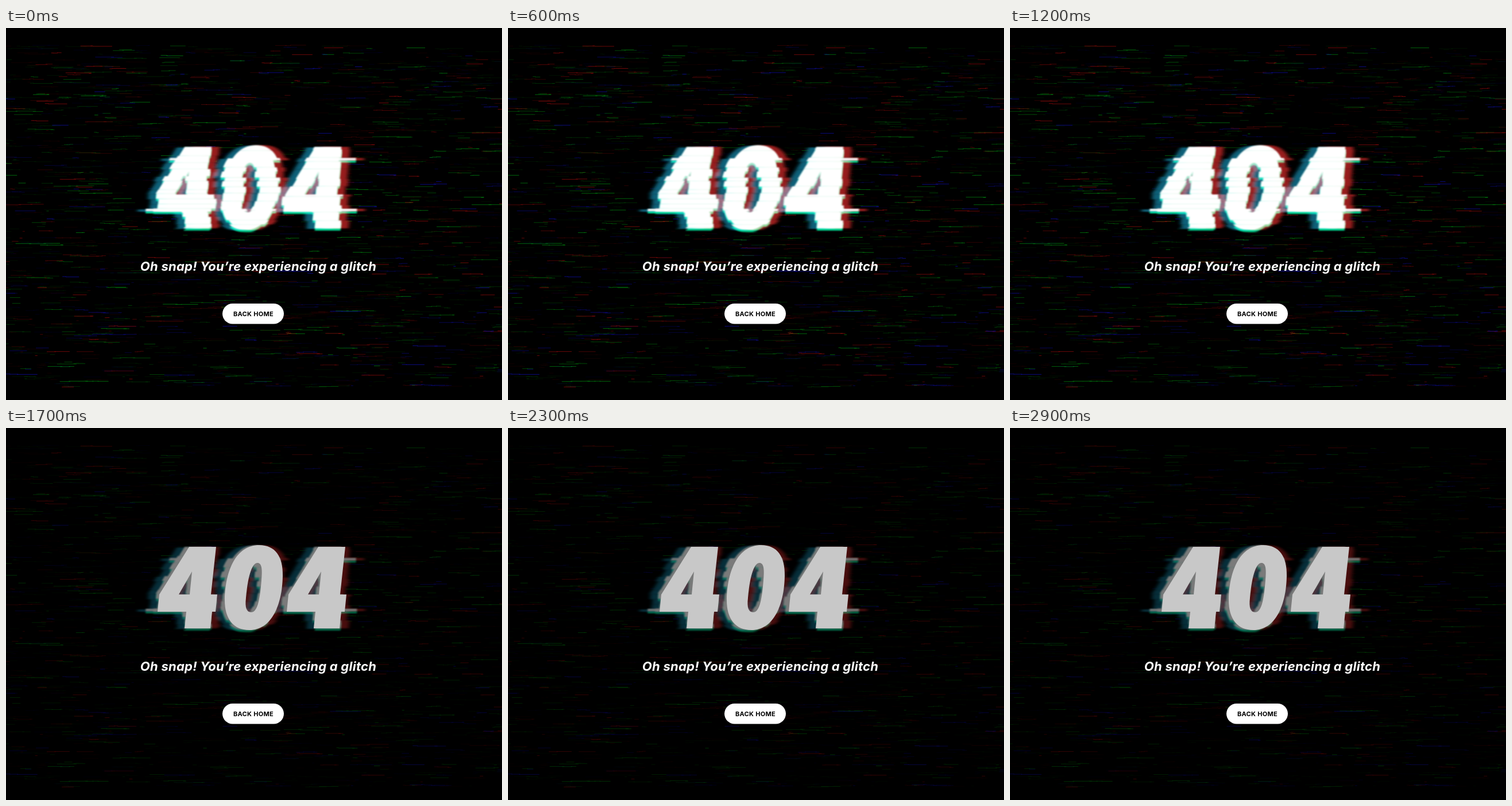
Write an HTML page that moves like this. It is 864x648 px and loops after 3000 ms.

```html
<!DOCTYPE html>
<html lang="en">
<head>
<meta charset="utf-8">
<title>404</title>
<style>
  html, body { margin: 0; width: 100%; height: 100%; overflow: hidden; background: #000; }
  svg { display: block; width: 100vw; height: 100vh; }
  text { font-family: Inter, "Open Sans", sans-serif; font-weight: 700; text-anchor: middle; }
  .message { font-size: 22px; font-style: italic; letter-spacing: 0.25px; font-feature-settings: "cv11"; }
  .label { font-size: 11px; letter-spacing: 0.3px; }
  .layers { isolation: isolate; }
  .layers use { mix-blend-mode: screen; }
</style>
</head>
<body>
<svg viewBox="0 0 864 648" xmlns="http://www.w3.org/2000/svg">
  <defs>
    <path id="four" fill-rule="evenodd"
      d="M319 207H366L357 290H368L365 320H359L356 349H311L314 320H264L267 290ZM324 250L301 290H320Z"/>
    <path id="zero" fill-rule="evenodd"
      d="M441 204C469 204 483 224 482 258C481 310 462 352 424 352C396 352 381 332 381 300C382 246 402 204 441 204Z
         M438 235C430 235 422 252 418 296C416 313 419 321 427 321C437 321 442 304 445 265C447 244 445 235 438 235Z"/>
    <g id="sliced"></g>
    <filter id="soft" x="-10%" y="-10%" width="120%" height="120%">
      <feGaussianBlur stdDeviation="1.8 0.9"/>
    </filter>
    <filter id="fringe" x="-10%" y="-10%" width="120%" height="120%">
      <feGaussianBlur stdDeviation="3.5 1.2"/>
    </filter>
  </defs>
  <rect width="864" height="648"/>
  <g id="glitch">
    <g id="noise" fill="none"></g>
    <g class="layers">
      <use href="#sliced" x="-14" y="1" fill="#0a6078" filter="url(#fringe)"/>
      <use href="#sliced" x="14" fill="#981e1a" filter="url(#fringe)"/>
      <use href="#sliced" y="4" fill="#00d08c" filter="url(#soft)"/>
      <use href="#sliced" fill="#fff" filter="url(#soft)"/>
    </g>
  </g>
  <g id="clean" fill="#c8c8c8"></g>
  <text class="message" x="439.5" y="423" fill="#fff">Oh snap! You’re experiencing a glitch</text>
  <rect x="377" y="480" width="107" height="35.5" rx="17.75" fill="#fff"/>
  <text class="label" x="431" y="502">BACK HOME</text>
</svg>
<script>
const $ = id => document.getElementById(id);

function add(parent, tag, attrs) {
  const node = document.createElementNS("http://www.w3.org/2000/svg", tag);
  for (const key in attrs) node.setAttribute(key, attrs[key]);
  parent.append(node);
  return node;
}

function seeded(seed) {
  return () => {
    seed = (seed + 0x6D2B79F5) | 0;
    let t = Math.imul(seed ^ (seed >>> 15), 1 | seed);
    t = (t + Math.imul(t ^ (t >>> 7), 61 | t)) ^ t;
    return ((t ^ (t >>> 14)) >>> 0) / 4294967296;
  };
}

const digits = [{ shape: "four", x: 0 }, { shape: "zero", x: 0 }, { shape: "four", x: 225 }];
const TOP = 200, BOTTOM = 356;
let sliceCount = 0;

function addSlice({ shape, x }, y, height, shift) {
  const id = "slice" + sliceCount++;
  const clip = add(document.querySelector("defs"), "clipPath", { id });
  add(clip, "rect", { x: 0, y, width: 864, height });
  const band = add($("sliced"), "g", { "clip-path": `url(#${id})` });
  add(band, "use", { href: "#" + shape, x: x + shift });
}

function buildDigits() {
  const random = seeded(7);
  digits.forEach((digit, index) => {
    add($("clean"), "use", { href: "#" + digit.shape, x: digit.x });
    // Slices lean left at the top and settle towards the foot.
    for (let y = TOP; y < BOTTOM;) {
      const height = 5 + random() * 13;
      const lean = -10 + 8 * (y - TOP) / (BOTTOM - TOP);
      addSlice(digit, y, height, lean + (random() - 0.5) * 10);
      y += height;
    }
    // Thin tears pull the outer digits away from the middle.
    for (const y of [226.5, 315]) addSlice(digit, y, 4, 21 * (index - 1));
  });
}

function buildNoise() {
  const random = seeded(404);
  const colors = ["#008c10", "#980c0c", "#1010b0"];
  const levels = 4;
  const paths = colors.map(() => Array(levels).fill(""));
  for (let i = 0; i < 2200; i++) {
    const pick = random();
    const color = pick < 0.46 ? 0 : pick < 0.76 ? 1 : 2;
    const level = Math.floor(random() ** 3 * levels);
    let x = random() * 900 - 40;
    let y = 30 + random() * 596;
    const parts = 1 + Math.floor(random() * 3);
    for (let p = 0; p < parts; p++) {
      const length = 4 + random() ** 2 * 32;
      paths[color][level] += `M${x.toFixed(1)} ${y.toFixed(1)}h${length.toFixed(1)}`;
      x += length * 0.85;
      y += (random() - 0.5) * 1.5;
    }
  }
  paths.forEach((row, c) => row.forEach((d, l) =>
    add($("noise"), "path", { d, stroke: colors[c], "stroke-opacity": 0.7 * ((l + 1) / levels) ** 1.3 })));
}

const LOOP = 3000, BEAT = 600, HOLD = 500;

function draw(time) {
  const blended = (time % LOOP) % BEAT >= HOLD;
  $("glitch").setAttribute("opacity", blended ? 0.48 : 1);
  $("clean").setAttribute("visibility", blended ? "visible" : "hidden");
}

buildDigits();
buildNoise();
const start = performance.now();
function tick() {
  draw(performance.now() - start);
  requestAnimationFrame(tick);
}
tick();
</script>
</body>
</html>
```
